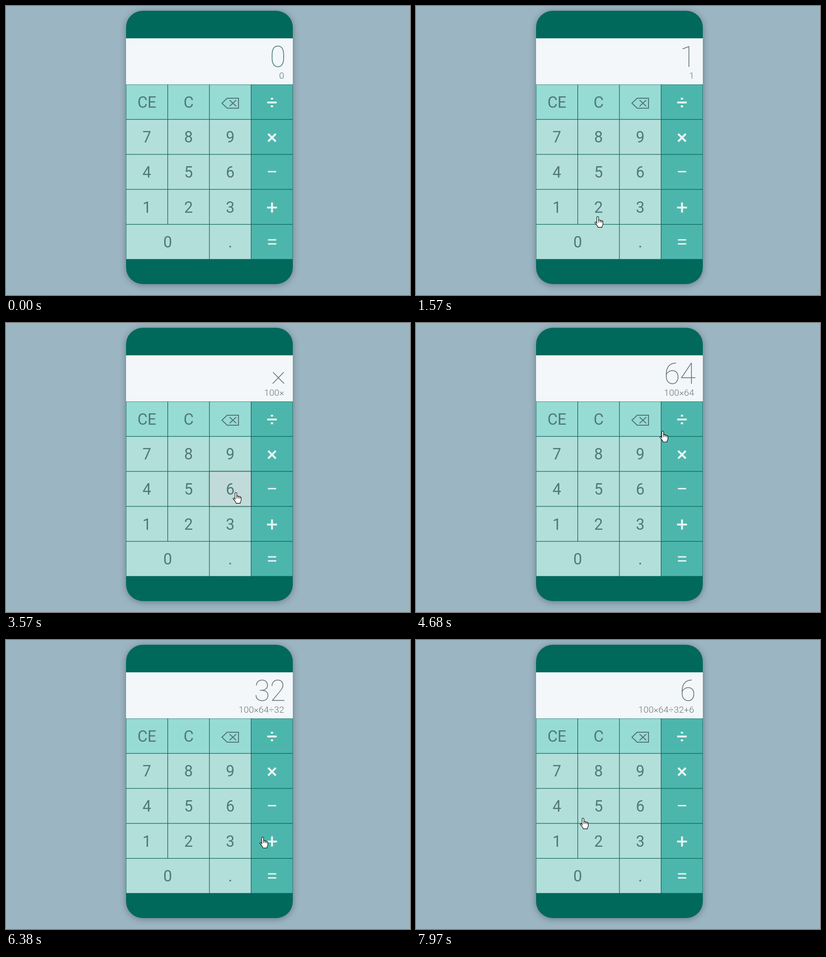
An HTML page that plays this animation: 848x608 px, repeating every 8000 ms.

```html
<!DOCTYPE html>
<html lang="en">
<head>
<meta charset="utf-8">
<title>Calculator</title>
<style>
  html, body { margin: 0; width: 100%; height: 100%; overflow: hidden; background: #9bb5c2; }
  svg { display: block; font-family: Roboto, sans-serif; }
  .body { fill: #00695c; filter: drop-shadow(0 2px 7px rgba(0, 0, 0, .32)); }
  .key rect { stroke: rgba(0, 0, 0, .1); }
  .key text { font-size: 32.5px; text-anchor: middle; fill: #527876; }
  .num rect { fill: #b2dfda; }
  .edit rect { fill: #97dbd5; }
  .op rect { fill: #4db6ac; }
  .edit path { fill: none; stroke: #527876; stroke-width: 2; }
  .op path { fill: none; stroke: #e6f4f3; }
  .on rect { fill: #c1dbda; filter: drop-shadow(0 0 2px rgba(0, 0, 0, .35)); }
  .on.op rect { fill: #78b5b0; }
  #big, #small { text-anchor: end; font-weight: 100; }
  #big { font-size: 60.8px; }
  #small { font-size: 19.2px; font-weight: 300; }
  #hand { fill: #fff; stroke: #000; stroke-width: 1.1; stroke-linejoin: round; }
</style>
</head>
<body>
<svg width="848" height="608" viewBox="0 0 848 608">
  <rect class="body" x="252" y="10" width="350" height="575" rx="35"/>
  <rect x="252" y="68" width="350" height="97" fill="#f3f7fa"/>
  <text id="big" x="587.4" y="128"></text>
  <text id="small" x="583.8" y="153"></text>
  <g id="keys"></g>
  <path id="hand" d="M4.7 15.5V2.6a1.9 1.9 0 0 1 3.8 0V9.2q.4-1.6 1.8-1.4t1.6 1.7q.4-1 1.6-.8t1.5 1.6q.4-.7 1.4-.4t1.2 1.7V16q0 2.2-1 3.8T15.6 23.4H7.2Q6.5 20.6 4.4 18.4L1 14.4Q.3 12.9 1.5 12.4T4.7 14ZM8.5 9.2V13M11.9 9.5V13M15 10.3V13.5"/>
</svg>
<script>
const LOOP = 8000, COL = 87.5, ROW = 73.6;
const $ = id => document.getElementById(id);

// Icons are [path, stroke width], centred on their key
const icons = {
  '⌫': ['M-17.5 2.7L-6.5-7.8H17.3V13.2H-6.5ZM-1.5-3.8L12.5 9.2M12.5-3.8L-1.5 9.2', 2],
  '÷': ['M-10 1.2H10M-2.4-6.8H2.4M-2.4 9.2H2.4', 4],
  '×': ['M-8-6.4L8 9.6M8-6.4L-8 9.6', 4],
  '−': ['M-8.5-.5H8.8', 3],
  '+': ['M-10.3 1.3H10.5M.1-9.3V12', 4],
  '=': ['M-8.5-4.2H9M-8.5 4.2H9', 3],
};
const rows = [['CE', 'C', '⌫', '÷'], ['7', '8', '9', '×'], ['4', '5', '6', '−'],
  ['1', '2', '3', '+'], ['0', '', '.', '=']];

const keys = {};
rows.forEach((row, r) => row.forEach((label, c) => {
  if (!label) return;
  const w = label === '0' ? 2 * COL : COL, icon = icons[label];
  const g = document.createElementNS('http://www.w3.org/2000/svg', 'g');
  g.setAttribute('transform', `translate(${252 + c * COL} ${165 + r * ROW})`);
  g.innerHTML = `<rect x=".5" y=".5" width="${w - 1}" height="${ROW - 1}"/>` + (icon
    ? `<path transform="translate(${w / 2} ${ROW / 2})" stroke-width="${icon[1]}" d="${icon[0]}"/>`
    : `<text x="${w / 2}" y="48.8">${label}</text>`);
  g.kind = 'key ' + (c === 3 ? 'op' : r ? 'num' : 'edit');
  keys[label] = g;
  $('keys').append(g);
}));

// [key, time it takes effect, how long it was visibly held]
const presses = [['1', 1450], ['0', 1980], ['0', 2270], ['×', 3000, 90], ['6', 3690, 150],
  ['4', 4130], ['÷', 5110, 90], ['3', 5720], ['2', 6090], ['+', 6750, 100], ['6', 7300]];

// Pointer stops: [arrival, x, y, wait]
const path = [[290, 765, 590], [560, 652, 402], [740, 507, 365], [860, 420, 351],
  [1070, 320, 439], [1250, 294, 434, 200], [1570, 375, 442], [1820, 332, 504, 160],
  [2090, 362, 495, 180], [2420, 400, 435], [2560, 500, 350], [2730, 546, 281, 420],
  [3400, 490, 350], [3570, 476, 356, 90], [3710, 430, 360], [3810, 309, 371, 320],
  [4250, 257, 365], [4450, 380, 310], [4680, 511, 227], [4860, 548, 200, 250],
  [5200, 520, 275], [5410, 457, 423, 169], [5580, 474, 385, 140], [5910, 362, 435, 180],
  [6200, 423, 430], [6380, 532, 414], [6500, 550, 418, 300], [7050, 475, 372],
  [7400, 470, 367], [7510, 440, 375], [7700, 395, 409], [7970, 344, 374]];

function pointerAt(t) {
  const i = path.findIndex(p => p[0] > t);
  if (i < 0) return path[path.length - 1].slice(1, 3);
  const [t0, x0, y0, wait = 0] = path[i - 1], [t1, x1, y1] = path[i];
  const k = Math.max(0, (t - t0 - wait) / (t1 - t0 - wait));
  return [x0 + (x1 - x0) * k, y0 + (y1 - y0) * k];
}

function draw(t) {
  const typed = presses.filter(p => p[1] <= t).map(p => p[0]).join('');
  const entry = typed.match(/\d*$/)[0] || typed.slice(-1);
  for (const [id, text] of [['big', entry], ['small', typed]]) {
    $(id).textContent = text || '0';
    $(id).setAttribute('fill', typed ? '#6a7476' : '#4a7c7a');
  }

  const down = presses.find(([, up, held = 0]) => t >= up - held && t < up);
  for (const label in keys) {
    const on = down && down[0] === label;
    keys[label].setAttribute('class', keys[label].kind + (on ? ' on' : ''));
  }
  // Keep the pressed key's shadow above its neighbours
  if (down && $('keys').lastChild !== keys[down[0]]) $('keys').append(keys[down[0]]);

  const shown = t >= path[0][0];
  $('hand').style.display = shown ? '' : 'none';
  if (shown) $('hand').setAttribute('transform', `translate(${pointerAt(t)})`);
}

const begin = performance.now();
function tick() {
  draw((performance.now() - begin) % LOOP);
  requestAnimationFrame(tick);
}
tick();
</script>
</body>
</html>
```
